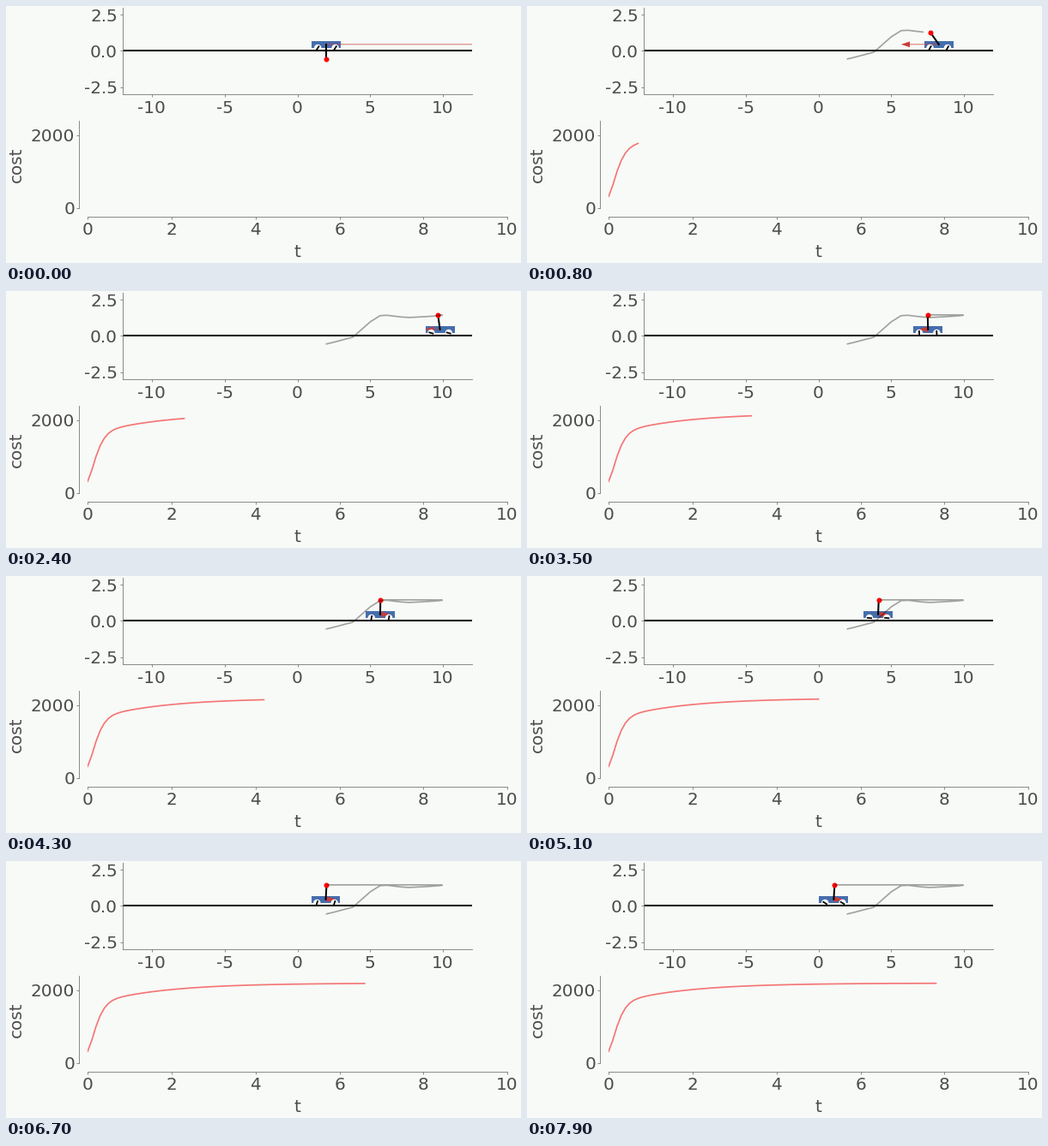
Write a matplotlib script that moves like this. It is 600x300 px and loops after 8 s.

```python
import numpy as np
import matplotlib
import matplotlib.pyplot as plt
from matplotlib.animation import FuncAnimation
from matplotlib.patches import Circle, Polygon, Rectangle

W, H, DPI = 600, 300, 100
FRAMES, STEP_MS = 80, 100
PT = 72 / DPI  # points per pixel
BG, INK, EDGE = "#f8faf7", "#4c4c4c", "#7f7f7f"
BLUE, ARROW, COST = "#466eac", "#c93c3c", "#f47575"
BODY_Y, WHEEL_R, WHEEL_DX = 0.45, 0.2, 0.6

matplotlib.rcParams.update({
    "font.family": "DejaVu Sans",
    "font.size": 20 * PT,
    "axes.unicode_minus": False,
})

DT = STEP_MS / 1000
time = np.arange(FRAMES) * DT


def cart_path(t):
    """Swing-up jerk, coast to the far point, then a damped return to zero."""
    far, turn = 10.18, 1.9
    u = np.maximum(t - turn, 0) / 1.36
    glide = far * (1 + u + 0.16 * u**2) * np.exp(-u)
    coast = 1.435 * np.maximum(turn - t, 0) ** 3
    jerk = np.interp(t, np.arange(6) * 0.1, [2, 2.83, 4.65, 5.86, 6.01, 6.4])
    return np.where(t < 0.55, jerk, glide - coast)


def pole_angle(t):
    """Angle from upright: flipped up, leaning left, then easing upright."""
    flip = np.interp(t, np.arange(8) * 0.1,
                     [-180, -155, -122.6, -58.5, -19, -14, -24, -31.8])
    settle = 3.6 - 38.6 * np.exp(-(t - 0.8) / 1.3)
    return np.radians(np.where(t < 0.75, flip, settle))


cart_x = cart_path(time)
angle = pole_angle(time)
force = 0.21 * np.gradient(np.gradient(cart_x, DT), DT)
cost = (2196 - 619 * np.exp(-time / 1.6)
        - 1261 * np.exp(-(time / 0.264) ** 1.45))
ball_x = cart_x + np.sin(angle)
ball_y = BODY_Y + np.cos(angle)


def make_axes(left, top, width, height, xlim, ylim, xticks, yticks,
              offset=0, ypad=3.0):
    ax = fig.add_axes([left / W, 1 - (top + height) / H, width / W, height / H],
                      facecolor="none")
    ax.spines[["top", "right"]].set_visible(False)
    for side in ("left", "bottom"):
        ax.spines[side].set(color=EDGE, linewidth=0.9 * PT)
        ax.spines[side].set_position(("outward", offset * PT))
    ax.set(xlim=xlim, ylim=ylim, xticks=xticks, yticks=yticks)
    ax.tick_params(length=3 * PT, width=0.9 * PT, pad=3.5 * PT,
                   color=EDGE, labelcolor=INK)
    ax.tick_params(axis="y", pad=ypad * PT)
    return ax


fig = plt.figure(figsize=(W / DPI, H / DPI), dpi=DPI, facecolor=BG)
view = make_axes(136, 1.55, 407, 101.75, (-12, 12), (-3, 3),
                 range(-10, 11, 5), [-2.5, 0, 2.5])
plot = make_axes(95.1, 133.9, 489, 101.8, (0, 10), (0, 2400),
                 range(0, 11, 2), [0, 2000], offset=10, ypad=2.0)

fig.text(12.2 / W, 1 - 185 / H, "cost", rotation=90, color=INK,
         ha="center", va="center")
fig.text(339.4 / W, 1 - 287.7 / H, "t", color=INK, ha="center", va="center")


def line(ax, color, width, z, **kw):
    return ax.plot([], [], color=color, lw=width * PT, zorder=z, **kw)[0]


view.axhline(0, color="black", lw=2 * PT, zorder=2)
body = view.add_patch(Rectangle((0, 0.2), 2, 0.5, fc=BLUE, ec="none", zorder=1))
shaft = line(view, ARROW, 0.9, 1.1, alpha=0.8, snap=False, solid_capstyle="butt")
head = view.add_patch(Polygon(np.zeros((3, 2)), fc=ARROW, ec="none", zorder=1.1))
wheels = [view.add_patch(Circle((0, WHEEL_R), 0.25, fc="white", ec="none", zorder=1.2))
          for _ in range(2)]
bars = [line(view, "black", 1.8, 2.1, solid_capstyle="butt") for _ in range(2)]
pole = line(view, "black", 2, 2.2)
ball = line(view, "red", 0, 2.3, marker="o", ms=6 * PT, mew=0)
trail = line(view, "black", 1.7, 2.4, alpha=0.35)
curve = line(plot, COST, 1.7, 2)


def draw(i):
    x, f = cart_x[i], force[i]
    body.set_x(x - 1)

    base, side = x + f, np.sign(f)
    shaft.set_data([x, base], [BODY_Y, BODY_Y])
    head.set_xy([(base, BODY_Y - 0.2), (base, BODY_Y + 0.2),
                 (base + 0.6 * side, BODY_Y)])

    roll = x / WHEEL_R
    dx, dy = 0.18 * np.sin(roll), 0.18 * np.cos(roll)
    for wheel, bar, off in zip(wheels, bars, (-WHEEL_DX, WHEEL_DX)):
        cx = x + off
        wheel.center = (cx, WHEEL_R)
        bar.set_data([cx - dx, cx + dx], [WHEEL_R - dy, WHEEL_R + dy])

    pole.set_data([x, ball_x[i]], [BODY_Y, ball_y[i]])
    ball.set_data([ball_x[i]], [ball_y[i]])
    trail.set_data(ball_x[:i], ball_y[:i])
    curve.set_data(time[:i], cost[:i])
    return [body, shaft, head, *wheels, *bars, pole, ball, trail, curve]


anim = FuncAnimation(fig, draw, frames=FRAMES, interval=STEP_MS,
                     repeat=True, repeat_delay=0)
plt.show()
```
